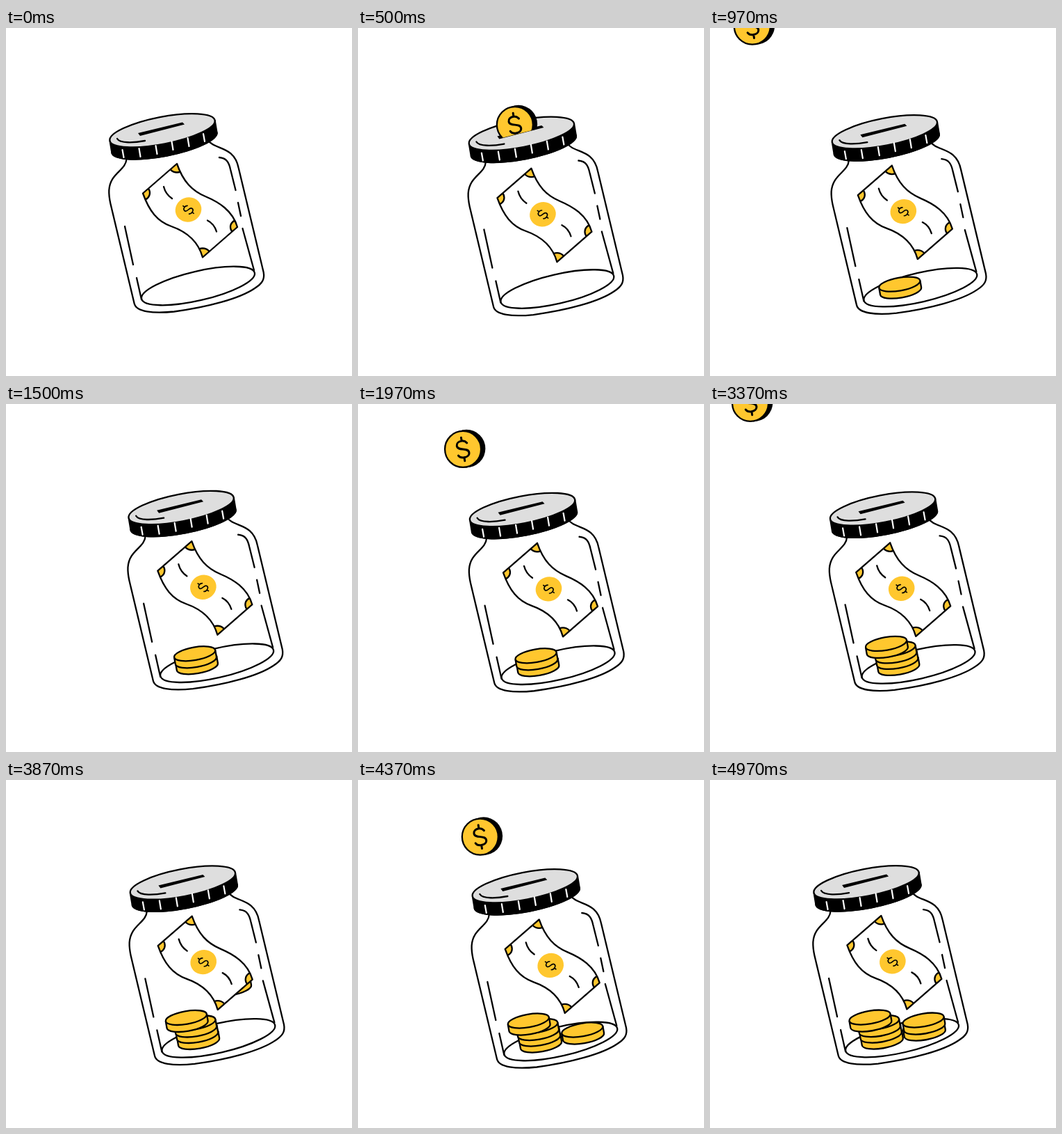
These frames come from a looping animation (498 px wide and 500 px high, 5010 ms). An HTML page:

```html
<!DOCTYPE html>
<html lang="en">
<head>
<meta charset="utf-8">
<title>Savings jar</title>
<style>
  html, body { margin: 0; width: 100%; height: 100%; overflow: hidden; background: #fff; }
  svg { display: block; width: 498px; height: 500px; }
  .line { fill: none; stroke: #000; stroke-width: 2.3; stroke-linecap: round; stroke-linejoin: round; }
  .gold { fill: #ffc72e; }
  .edge { stroke: #000; stroke-width: 2.3; stroke-linejoin: round; }
  .tick { fill: none; stroke: #fff; stroke-width: 2.2; stroke-linecap: round; }
</style>
</head>
<body>
<svg viewBox="0 0 498 500">
  <defs>
    <path id="dollar" d="M7-8C5-11 2-12 0-12C-5-12-8-9.500-8-6C-8 2 8-2 8 6C8 10 4 12 0 12C-4 12-7 10-8 8M0-17V-12M0 12V17"
      fill="none" stroke="#000" stroke-width="3" stroke-linecap="round"/>
    <path id="note" d="M246 195C255 221 268 234 287 242S326 262 333 286L283 329.500C276 304 258 292 238 285S206 263 197 237.500Z"/>
    <clipPath id="noteClip"><use href="#note"/></clipPath>
    <clipPath id="aboveSlot"><path d="M-100-100H500V77L-100 228Z"/></clipPath>
    <g id="flat">
      <path class="gold edge" d="M-30 0V10A30 9.500 0 0 0 30 10V0" transform="rotate(-10)"/>
      <ellipse class="gold edge" rx="30" ry="9.300" transform="rotate(-10)"/>
    </g>
  </defs>

  <g class="sway">
    <ellipse class="line" cx="276.500" cy="370.500" rx="83.500" ry="21" transform="rotate(-13 276.500 370.500)"/>
    <g id="pile"></g>
  </g>

  <g id="bill">
    <use href="#note" fill="#fff"/>
    <g class="gold edge" clip-path="url(#noteClip)">
      <circle cx="246" cy="195" r="12.500"/>
      <circle cx="197" cy="237" r="10"/>
      <circle cx="333" cy="286" r="10"/>
      <circle cx="283" cy="329" r="12.500"/>
    </g>
    <use href="#note" class="line"/>
    <path class="line" d="M227 228C229 236 233 241 239 245M290 276.500C297 280 301 286 303 292.500"/>
    <ellipse class="gold" cx="262.500" cy="261" rx="19" ry="17.500" transform="rotate(-20 262.500 261)"/>
    <use href="#dollar" transform="translate(262.500 261) rotate(-55) scale(.55)"/>
  </g>

  <g class="sway">
    <path class="line" d="M173.500 188C172.500 205 150 208 148.300 233C148 240 149 246 150.300 252L184.700 396C187.500 408 212 410.500 242 407.500C290 401 336 389 358 374C369 367 372.500 361 370.700 351L334.700 201C328 168 299 176 290 160"/>
    <path class="line" d="M307 186C318 187 321 194 323 203L330.500 233M334 251L338 270M340.500 288L357 348M171 285L183 340M188 359L195 390"/>
    <path d="M148.400 162L151.400 180A78 20 -11 0 0 304.600 150L301.600 132Z"/>
    <ellipse cx="228" cy="165" rx="78" ry="20" transform="rotate(-11 228 165)"/>
    <ellipse cx="225" cy="147.200" rx="77" ry="19.500" transform="rotate(-11 225 147.200)" fill="#dedede" class="edge"/>
    <path d="M190 151L254 135.500L257 138.500L193 155Z"/>
    <path class="line" d="M160 159C164 166 184 165 200 162"/>
    <path class="tick" d="M167.500 175L169.500 186M191.500 173L193.500 185M215.500 169L217.500 181M238.500 163L240.500 175M261.500 158L263.500 170M284 152L286 163"/>
    <g clip-path="url(#aboveSlot)">
      <g id="coin">
        <circle cx="5" cy="-1" r="27.300"/>
        <circle class="gold edge" r="26"/>
        <use href="#dollar" transform="rotate(-9)"/>
      </g>
    </g>
  </g>
</svg>
<script>
  const LOOP = 5010, STEP = 33.4;
  // Each coin: the step at which it passes the top edge, and where it comes to rest.
  const coins = [
    [6, 246.5, 366], [29, 244.5, 357], [54, 242.5, 348.5],
    [79, 230, 341], [101, 307.5, 354], [125, 307, 345]
  ];
  const $ = id => document.getElementById(id);
  const move = (el, x, y) => el.setAttribute('transform', `translate(${x.toFixed(2)} ${y.toFixed(2)})`);
  const show = (el, on) => el.setAttribute('display', on ? 'inline' : 'none');
  const sway = document.querySelectorAll('.sway');

  const flats = coins.map(() => {
    const use = document.createElementNS('http://www.w3.org/2000/svg', 'use');
    use.setAttribute('href', '#flat');
    return $('pile').appendChild(use);
  });

  // Arc of the thrown coin, relative to the jar; u counts steps.
  function flight(u) {
    const v = Math.min(u, 8.5);
    const d = 21 * v + (v < 0 ? 1.65 * v * v : 0);
    const drop = u - v;
    return [34.5 + d + 5 * drop, -4.5 + 0.48 * d + 0.0013 * d * d + 24 * drop];
  }

  function draw(now) {
    const k = Math.floor((now % LOOP) / STEP + 0.3);
    const a = 4 * Math.PI * k * STEP / LOOP;
    const dx = 15 * (1 - Math.cos(a));
    const dy = 2.5 * (1 - Math.cos(2 * a));
    sway.forEach(g => move(g, dx, dy));
    move($('bill'),
      10.5 * (1 - Math.cos(a)) - 4 * Math.sin(a),
      3.1 * (1 - Math.cos(2 * a)) + 0.8 * Math.sin(a) + 0.6 * Math.sin(2 * a));

    let flying = false;
    coins.forEach(([start, x, y], i) => {
      const u = k - start;
      if (u >= -6 && u < 12) {
        flying = true;
        move($('coin'), ...flight(u));
      }
      const p = Math.min(1, (u - 11) / 5);
      show(flats[i], p >= 0);
      if (p >= 0) move(flats[i], x + (232 - x) * (1 - p), y + (175 - y) * (1 - p * p));
    });
    show($('coin'), flying);
  }

  function tick() {
    draw(performance.now());
    requestAnimationFrame(tick);
  }
  tick();
</script>
</body>
</html>
```
